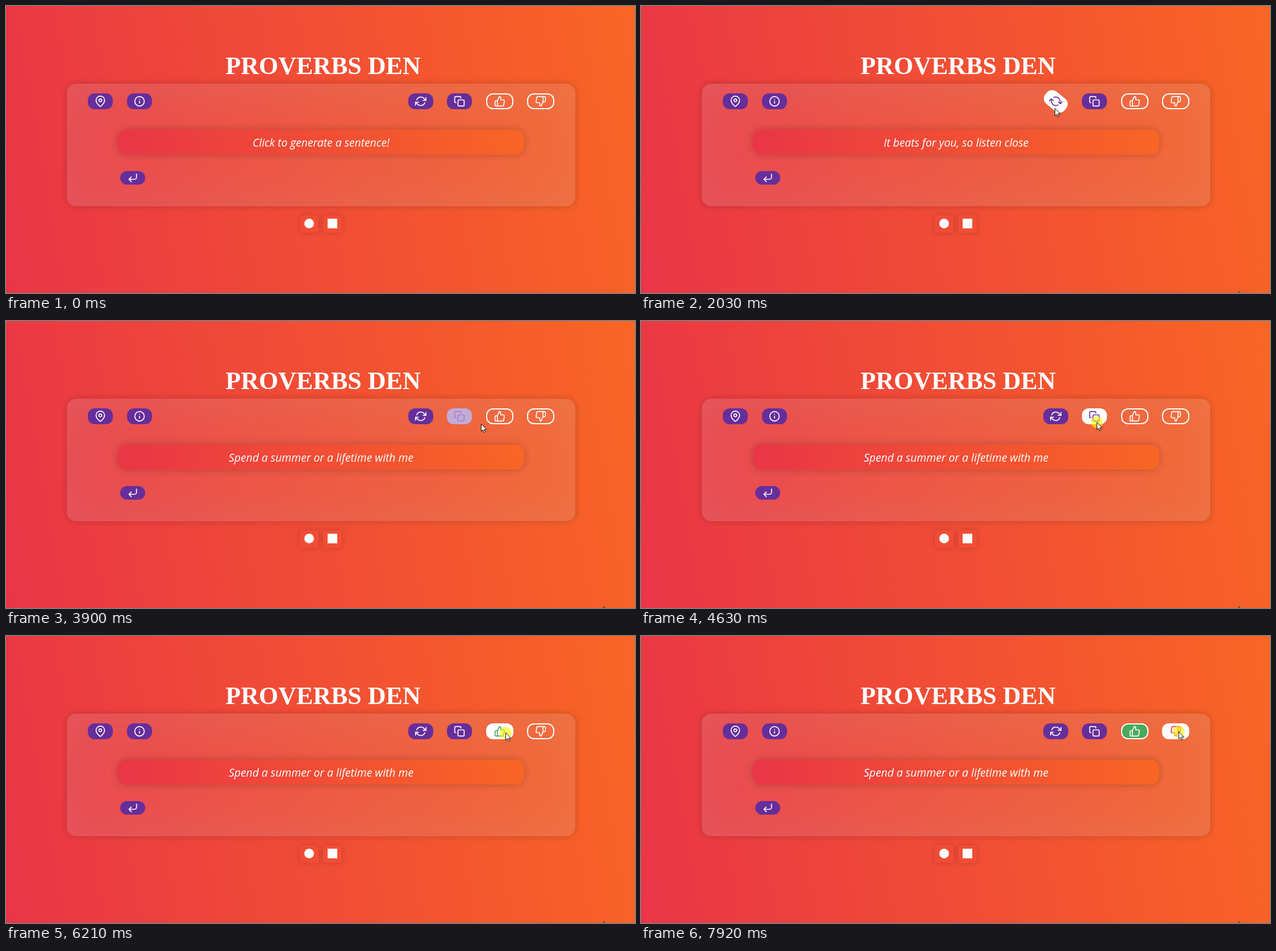
An HTML page for the animation above (8 s loop, 1107 by 506 pixels).

```html
<!DOCTYPE html>
<html lang="en">
<head>
<meta charset="utf-8">
<title>Sentence generator</title>
<style>
  :root { --red: #ea3546; --orange: #f86624; --purple: #662e9b; --green: #4aa95b; }
  html, body { margin: 0; width: 100%; height: 100%; overflow: hidden; }
  body { position: relative; background: linear-gradient(80deg, var(--red), var(--orange)); color: #fff; }
  body > * { position: absolute; box-sizing: border-box; }
  h1 {
    left: 258px; top: 80px; width: 600px; margin: 0; text-align: center; white-space: nowrap;
    font: bold 44px/52px "Liberation Serif", serif;
  }
  .card {
    left: 107px; top: 137px; width: 895px; height: 216px; border-radius: 16px;
    background: rgba(205, 205, 205, .1);
    box-shadow: 0 0 12px rgba(0, 0, 0, .2), inset 0 0 80px rgba(190, 215, 225, .1);
  }
  .line {
    left: 197px; top: 218px; width: 715px; height: 44px; border-radius: 16px;
    background: linear-gradient(80deg, var(--red), var(--orange));
    box-shadow: 0 0 14px rgba(0, 0, 0, .22);
    font: italic 19.4px/45px "Open Sans", sans-serif; text-align: center; white-space: nowrap;
  }
  .btn {
    --h: 0%; --bg: var(--purple); --ink: var(--purple);
    display: flex; align-items: center; justify-content: center;
    top: 154px; width: 44px; height: 28px; border-radius: 12px;
    background: color-mix(in srgb, #fff var(--h), var(--bg));
    color: color-mix(in srgb, var(--ink) var(--h), #fff);
  }
  .vote { --bg: transparent; width: 48px; border: 2px solid #fff; }
  .btn svg {
    width: 20px; height: 20px; flex: none; fill: none; stroke: currentColor;
    stroke-width: 2; stroke-linecap: round; stroke-linejoin: round;
  }
  .link {
    top: 369px; width: 33px; height: 31px; border-radius: 4px;
    box-shadow: 0 0 10px rgba(0, 0, 0, .18);
  }
  .link::after {
    content: ""; position: absolute; left: 8px; top: 6px; width: 17px; height: 17px; background: #fff;
  }
  .round::after { border-radius: 50%; }
  #spot {
    left: -10.5px; top: -10.5px; width: 21px; height: 21px; border-radius: 50%;
    background: rgba(255, 245, 0, .6);
  }
  #cursor { left: 0; top: 0; width: 14px; height: 20px; overflow: visible; }
  #mark { left: 1051px; top: 502px; width: 5px; height: 4px; background: #69503f; clip-path: polygon(0 0, 100% 100%, 0 100%); }
</style>
</head>
<body>
<h1>PROVERBS DEN</h1>
<div class="card"></div>
<div class="line" id="line"></div>

<div class="btn" style="left:144px"><svg viewBox="0 0 24 24"><path d="M21 10c0 7-9 13-9 13s-9-6-9-13a9 9 0 0 1 18 0z"/><circle cx="12" cy="10" r="3"/></svg></div>
<div class="btn" style="left:213px"><svg viewBox="0 0 24 24"><circle cx="12" cy="12" r="10"/><path d="M12 16v-4M12 8h.01"/></svg></div>
<div class="btn" id="refresh" style="left:707.5px"><svg viewBox="0 0 24 24"><path d="M23 4v6h-6M1 20v-6h6M3.51 9a9 9 0 0 1 14.85-3.36L23 10M1 14l4.64 4.36A9 9 0 0 0 20.49 15"/></svg></div>
<div class="btn" id="copy" style="left:776px"><svg viewBox="0 0 24 24"><rect x="9" y="9" width="13" height="13" rx="2"/><path d="M5 15H4a2 2 0 0 1-2-2V4a2 2 0 0 1 2-2h9a2 2 0 0 1 2 2v1"/></svg></div>
<div class="btn vote" id="up" style="left:844.8px;--ink:var(--green)"><svg viewBox="0 0 24 24"><path d="M14 9V5a3 3 0 0 0-3-3l-4 9v11h11.28a2 2 0 0 0 2-1.7l1.38-9a2 2 0 0 0-2-2.3zM7 22H4a2 2 0 0 1-2-2v-7a2 2 0 0 1 2-2h3"/></svg></div>
<div class="btn vote" id="down" style="left:916.8px;--ink:var(--red)"><svg viewBox="0 0 24 24"><path d="M10 15v4a3 3 0 0 0 3 3l4-9V2H5.72a2 2 0 0 0-2 1.7l-1.38 9a2 2 0 0 0 2 2.3zm7-13h2.67A2.31 2.31 0 0 1 22 4v7a2.31 2.31 0 0 1-2.33 2H17"/></svg></div>
<div class="btn" style="left:201.4px;top:291px;height:24px"><svg viewBox="0 0 24 24"><path d="M9 10l-5 5 5 5M20 4v7a4 4 0 0 1-4 4H4"/></svg></div>

<div class="link round" style="left:517px"></div>
<div class="link" style="left:558px"></div>

<div id="mark"></div>
<div id="spot"></div>
<svg id="cursor" viewBox="0 0 14 20"><path d="M.5.5v13.2l3-2.8 2 4.8 2-.9-2-4.6h4.2z" fill="#fff" stroke="#111"/></svg>

<script>
const LOOP = 8000, SPIN = 490, FADE = 200;
const $ = id => document.getElementById(id);

// pointer tip: time, x, y
const path = [
  [160, 1051, 502], [950, 735, 202], [1030, 735, 195], [1300, 728, 180],
  [3460, 728, 180], [3950, 839, 181], [4260, 806, 179], [4490, 802, 178],
  [4720, 802, 178], [5240, 914, 174], [5430, 886, 171], [5840, 879, 170],
  [6320, 879, 170], [7000, 909, 172], [7380, 946, 168], [LOOP, 946, 168]
];
const lines = [
  [0, "Click to generate a sentence!"],
  [1733, "It beats for you, so listen close"],
  [2921, "Spend a summer or a lifetime with me"]
];
const spins = [1733, 2921];
const clicks = [[1690, 1780], [2880, 2970], [4630, 4720], [6210, 6320], [7920, LOOP]];
const hot = { refresh: [707, 752], copy: [776, 821], up: [845, 893], down: [917, 965] };

function tip(t) {
  const i = path.findIndex(p => p[0] > t);
  if (i < 1) return path[0].slice(1);
  const [t0, x0, y0] = path[i - 1], [t1, x1, y1] = path[i];
  const u = (t - t0) / (t1 - t0), e = u * u * (3 - 2 * u);
  return [x0 + (x1 - x0) * e, y0 + (y1 - y0) * e];
}

function over([left, right], t) {
  const [x, y] = tip(t);
  return x >= left && x <= right && y >= 154 && y <= 182;
}

// share of the last FADE ms spent over the button: a linear hover transition
function hover(box, t) {
  const n = 20;
  let sum = 0;
  for (let i = 0; i < n; i++) sum += over(box, t - i * FADE / n);
  return sum / n;
}

function draw(t) {
  const [x, y] = tip(t), seen = t >= 160;
  const move = `translate(${x}px, ${y}px)`;
  $("cursor").style.transform = $("spot").style.transform = move;
  $("cursor").style.opacity = $("mark").style.opacity = +seen;
  $("spot").style.opacity = +clicks.some(([a, b]) => t >= a && t < b);

  for (const id in hot) $(id).style.setProperty("--h", hover(hot[id], t) * 100 + "%");
  $("up").style.setProperty("--bg", t >= 6210 ? "var(--green)" : "transparent");

  const start = spins.find(s => t >= s && t < s + SPIN);
  $("refresh").style.transform = start ? `rotate(${(t - start) / SPIN * 360}deg)` : "none";

  const text = lines.filter(l => t >= l[0]).pop()[1];
  if ($("line").textContent !== text) $("line").textContent = text;
}

const begin = performance.now();
function tick(now) {
  draw(Math.max(0, now - begin) % LOOP);
  requestAnimationFrame(tick);
}
draw(0);
requestAnimationFrame(tick);
</script>
</body>
</html>
```
